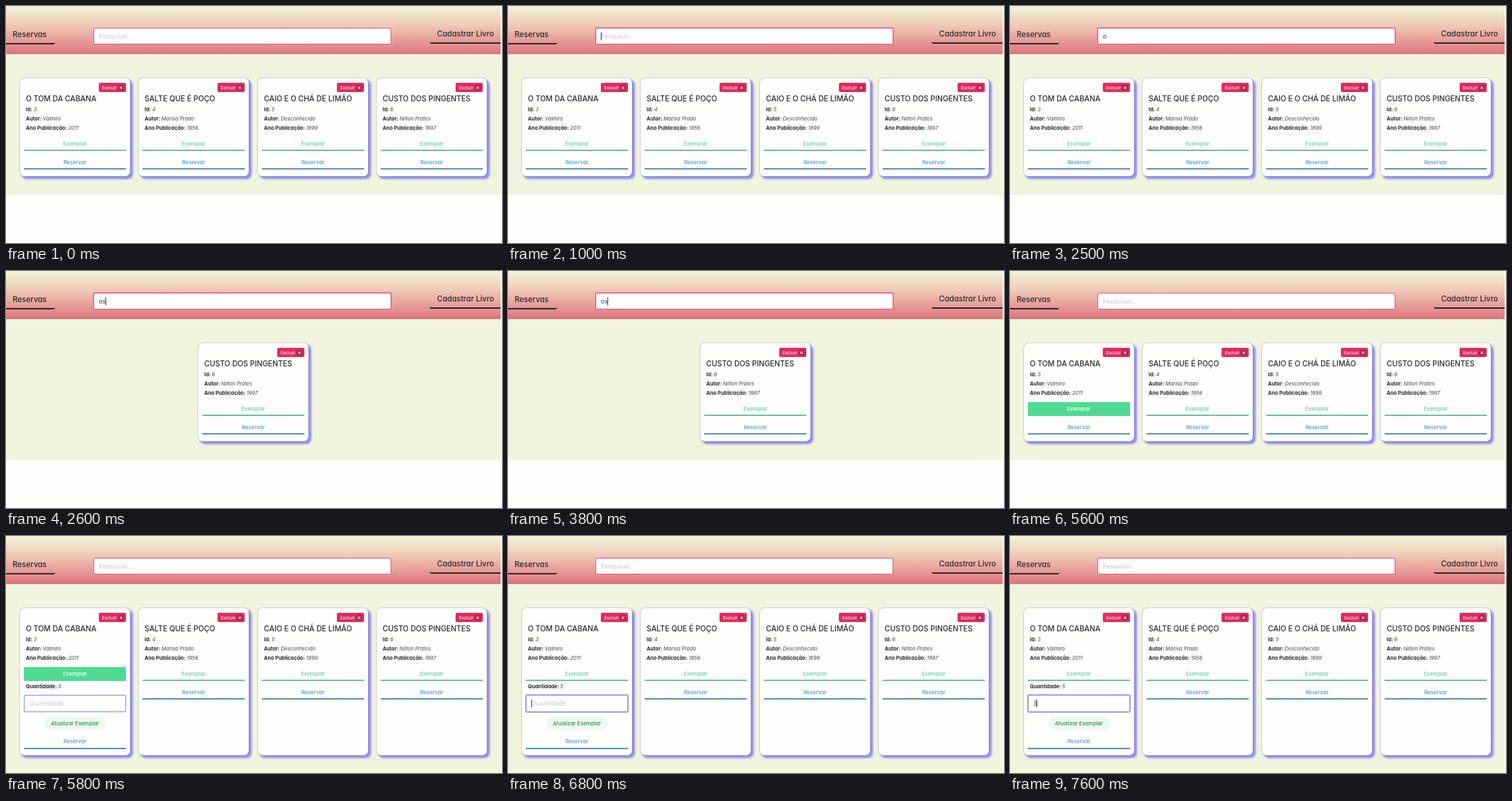
Recreate the animation shown at these times as an HTML page. Size 748x358 px, loop 8000 ms.

```html
<!DOCTYPE html>
<html lang="pt-BR">
<head>
<meta charset="utf-8">
<title>Livros</title>
<style>
html, body { margin: 0; width: 100%; height: 100%; overflow: hidden; }
body { background: #fefefc; font: 500 7.7px/20px Inter, "Open Sans", sans-serif;
  font-feature-settings: "cv11"; color: #2a2a2a; }
#stage { position: relative; width: 748px; height: 358px; overflow: hidden; }
#stage div { position: absolute; box-sizing: border-box; white-space: nowrap; }
#main { left: 0; top: 0; width: 746px; height: 285px; background: #f1f4dc; }
#edge { left: 747px; top: 0; width: 1px; height: 358px; background: #efefec; }
#head { left: 0; top: 0; width: 746px; height: 73px;
  background: linear-gradient(#f0f5da, #efc9b8 29px, #df7880 71px, #b3606a 72px, #f1f4dc 73px); }
.nav { height: 30px; font-size: 11.5px; line-height: 30px; border-bottom: 2px solid #2a2021; }
#left { left: 0; top: 28px; width: 74px; padding-left: 10px; border-radius: 0 0 3px 0; }
#right { left: 639px; top: 27px; width: 107px; padding-left: 11px; border-radius: 0 0 0 3px; }
.field { background: #fff; border: 1px solid; border-radius: 2px;
  font: 9.4px/24px "Noto Sans", "Open Sans", sans-serif; padding-left: 7px; color: #333; }
.field.focus { box-shadow: 0 0 1px 1px var(--glow); }
.field i { font-style: normal; color: #c4c4c4; }
.field b { display: inline-block; width: 1px; height: 12px; margin-right: -1px;
  background: #333; vertical-align: -2.5px; }
#search { left: 132px; top: 33px; width: 449px; height: 25px; border-color: #e0587a; --glow: #ec8098; }
.card { top: 109px; width: 166px; height: 148px; border-radius: 7px; background: #fefefd;
  box-shadow: 0 0 1px 1px rgba(149, 140, 232, .4), 3.5px 3.5px 3px 1px #958ce8; }
.open .card { height: 222px; }
.title { left: 9px; top: 21px; font-size: 11.2px; }
.row { left: 9px; font-weight: 700; }
.row i { font-weight: 400; color: #444; }
.del { left: 119px; top: 7px; width: 41px; height: 14px; border-radius: 2px; background: #df2d60;
  color: #fff; font: 7.2px/14px "Noto Sans", sans-serif; padding-left: 5px; }
.del div { left: 29px; top: 3px; width: 9px; height: 9px; border-radius: 2px; background: #b3244f; }
.del div::before, .del div::after { content: ""; position: absolute; left: 2px; top: 4px;
  width: 5px; height: 1px; background: #fff; transform: rotate(45deg); }
.del div::after { transform: rotate(-45deg); }
.link { left: 6px; width: 154px; height: 21px; font-size: 8px; text-align: center; border-bottom: 2px solid; }
.copy { top: 89px; color: #67cba2; border-color: #66c09b; }
.copy.hover { background: #4edb90; border-color: #4edb90; color: #fff; }
.book { top: 117px; color: #4b94c8; border-color: #528db2; }
.extra { left: 0; top: 0; width: 165px; display: none; }
.open .extra { display: block; }
.open .extra ~ .book { top: 192px; line-height: 19px; }
#qty { left: 6px; top: 131px; width: 154px; height: 26px; border-color: #8286e2; --glow: #a9acf0; }
#qty:not(.focus) { box-shadow: 0 0 1px var(--glow); }
.pill { left: 37px; top: 164px; width: 92px; height: 20px; border-radius: 10px; background: #edf8f0;
  color: #2c8a5b; font-size: 8px; text-align: center; }
</style>
</head>
<body>
<div id="stage">
  <div id="main"></div>
  <div id="edge"></div>
  <div id="head">
    <div class="nav" id="left">Reservas</div>
    <div class="nav" id="right">Cadastrar Livro</div>
    <div class="field" id="search"></div>
  </div>
</div>
<script>
const LOOP = 8000;
const stage = document.getElementById('stage');
const main = document.getElementById('main');
const books = [
  ['O TOM DA CABANA', 3, 'Valmiro', 2011],
  ['SALTE QUE É POÇO', 4, 'Marisa Prado', 1956],
  ['CAIO E O CHÁ DE LIMÃO', 5, 'Desconhecido', 1899],
  ['CUSTO DOS PINGENTES', 6, 'Nilton Prates', 1997]
];

const row = (top, label, value) =>
  `<div class="row" style="top:${top}px">${label}: <i>${value}</i></div>`;

const extra = `<div class="extra">${row(109, 'Quantidade', 5)}
  <div class="field" id="qty"></div><div class="pill">Atualizar Exemplar</div></div>`;

const cards = books.map(([title, id, author, year], i) => {
  const card = document.createElement('div');
  card.className = 'card';
  card.innerHTML = `<div class="del">Excluir<div></div></div>
    <div class="title">${title}</div>
    ${row(38, 'Id', id)}${row(51.5, 'Autor', author)}${row(65.5, 'Ano Publicação', year)}
    <div class="link copy">Exemplar</div>${i ? '' : extra}
    <div class="link book">Reservar</div>`;
  stage.append(card);
  return card;
});

const search = document.getElementById('search');
const qty = document.getElementById('qty');
const copy = cards[0].querySelector('.copy');

const within = (t, ...spans) => spans.some(([a, b]) => t >= a && t < b);

function setField(el, text, hint, focus, caret) {
  const bar = caret ? '<b></b>' : '';
  const html = text ? text + bar : `${bar}<i>${hint}</i>`;
  if (el.shown !== html) el.innerHTML = el.shown = html;
  el.classList.toggle('focus', focus);
}

function query(t) {
  if (within(t, [2600, 3900])) return 'os';
  return within(t, [1900, 4300]) ? 'o' : '';
}

function render(t) {
  const text = query(t);
  const open = t >= 5800;
  setField(search, text, 'Pesquisar...', within(t, [1000, 5600]),
    within(t, [1000, 1600], [1900, 2500], [2600, 3200], [3800, 5000]));
  setField(qty, t >= 7600 ? '3' : '', 'Quantidade', t >= 6800,
    within(t, [6800, 7400], [7600, LOOP]));
  copy.classList.toggle('hover', within(t, [5300, 6800]));
  stage.classList.toggle('open', open);
  main.style.height = (open ? 358 : 285) + 'px';

  const found = cards.filter((c, i) => books[i][0].toLowerCase().includes(text));
  const first = found.length === 1 ? 290 : 21;
  cards.forEach(c => {
    const n = found.indexOf(c);
    c.style.display = n < 0 ? 'none' : '';
    c.style.left = Math.round(first + n * 179.3) + 'px';
  });
}

const start = performance.now();
function tick() {
  render((performance.now() - start) % LOOP);
  requestAnimationFrame(tick);
}
render(0);
requestAnimationFrame(tick);
</script>
</body>
</html>
```
